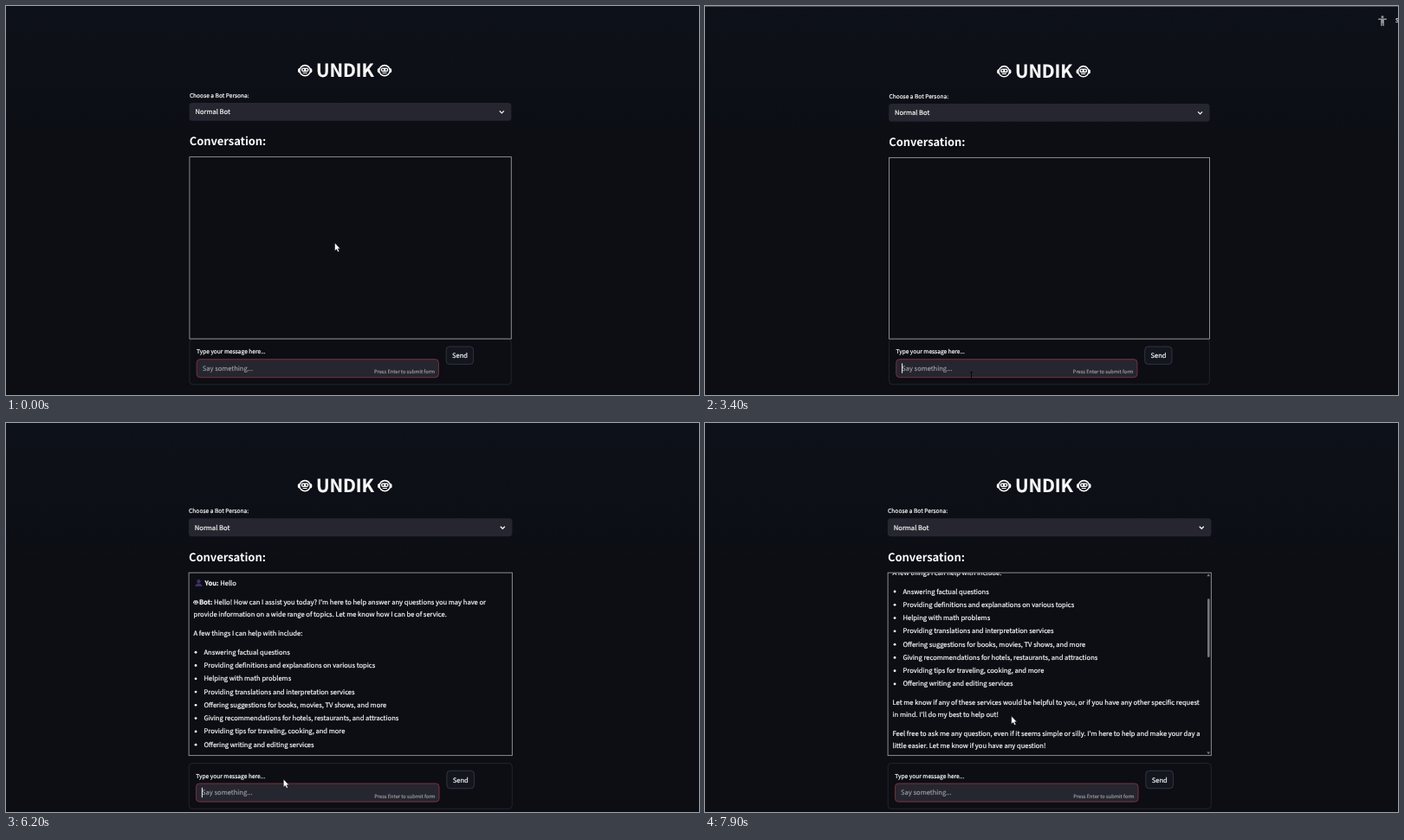
Recreate the animation shown at these times as an HTML page. Size 800x450 px, loop 8 s.

```html
<!DOCTYPE html>
<html lang="en">
<head>
<meta charset="utf-8">
<title>Chat demo</title>
<style>
  html, body { margin: 0; width: 100%; height: 100%; overflow: hidden; background: #0c0e14; }
  svg { display: block; width: 100vw; height: 100vh; }
  text {
    font-family: "Noto Sans CJK JP", "Noto Sans CJK SC", "Noto Sans CJK", "Open Sans", sans-serif;
    font-size: 7.56px; color: #fafafa; fill: currentColor; stroke: currentColor; stroke-width: .2px;
    white-space: pre; text-rendering: geometricPrecision;
  }
  .b { font-weight: 700; }
  .label { font-size: 6.62px; }
  .hint { font-size: 5.67px; color: #a2a3a9; stroke-width: .12px; text-anchor: end; }
  .title { font-size: 20.8px; font-weight: 700; letter-spacing: -.005em; text-anchor: middle; }
  .head { font-size: 12.98px; font-weight: 700; letter-spacing: -.005em; stroke: none; }
  .ghost { color: #a2a3a9; stroke-width: .12px; }
  .man { fill: none; stroke: #94969c; stroke-width: 1.5; stroke-linecap: round; stroke-linejoin: round; }
</style>
</head>
<body>
<svg id="stage" viewBox="0 0 800 450" xmlns="http://www.w3.org/2000/svg"></svg>
<script>
const LOOP = 8000;
const SENT = 3000, REPLY = 4800;

const text = (x, y, str, cls = "") => `<text x="${x}" y="${y}" class="${cls}">${str}</text>`;

const robot = (x, y, k = 1) => `<g transform="translate(${x} ${y}) scale(${k})">
  <rect x="-8.2" y="-2.6" width="16.4" height="5.4" rx="1.8" fill="#fafafa"/>
  <circle r="6.9" fill="#fafafa"/>
  <ellipse rx="5.4" ry="5.2" fill="#0c0e14"/>
  <rect x="-4.3" y="-3.2" width="8.6" height="4.6" rx="2" fill="#fafafa"/>
  <circle cx="-1.9" cy="-.9" r="1" fill="#0c0e14"/><circle cx="1.9" cy="-.9" r="1" fill="#0c0e14"/>
  <path d="M-2.6 2.8H2.6" stroke="#fafafa" stroke-width="1.1"/></g>`;

const skills = [
  "Answering factual questions",
  "Providing definitions and explanations on various topics",
  "Helping with math problems",
  "Providing translations and interpretation services",
  "Offering suggestions for books, movies, TV shows, and more",
  "Giving recommendations for hotels, restaurants, and attractions",
  "Providing tips for traveling, cooking, and more",
  "Offering writing and editing services"
];
const bullets = skills.map((s, i) => {
  const y = 268.7 + 15.2 * i;
  return `<circle cx="219.8" cy="${y - 2.5}" r="1.4" fill="#fafafa"/>` + text(229.2, y, s);
}).join("");

const chat = `
  <g fill="#3f2f66"><circle cx="223.2" cy="184.6" r="2.2"/>
  <path d="M219.2 190.4q0-3.4 4-3.4t4 3.4z"/></g>
  ${text(230.2, 189.05, '<tspan class="b">You:</tspan> Hello')}
  ${robot(219.9, 208.7, .36)}
  ${text(223.7, 211.4, '<tspan class="b">Bot:</tspan> Hello! How can I assist you today? I\'m here to help answer any questions you may have or')}
  ${text(217.3, 224.9, "provide information on a wide range of topics. Let me know how I can be of service.")}
  ${text(217.3, 246.8, "A few things I can help with include:")}
  ${bullets}
  ${text(217.3, 397, "Let me know if any of these services would be helpful to you, or if you have any other specific request")}
  ${text(217.3, 410.4, "in mind. I'll do my best to help out!")}
  ${text(217.3, 432.3, "Feel free to ask me any question, even if it seems simple or silly. I'm here to help and make your day a")}
  ${text(217.3, 445.8, "little easier. Let me know if you have any question!")}`;

const poses = [
  "M783.5 13.2L782.5 17L785.5 18.6L784.5 22M782.5 17L779.5 20.5M779.5 15.5L783.5 13.2L787 16",
  "M779.2 13.8H787.8M783.5 14V17.6M782.4 14.4V21.2M784.6 14.4V21.2",
  "M784.5 12.6L782.4 16.4L786 18L787.4 21.2M782.4 16.4L778.8 20.6M780.2 13.4L784.5 12.6L787.6 15.4"
];

const stage = document.getElementById("stage");
stage.innerHTML = `
<defs>
  <linearGradient id="bg" x2="0" y2="1">
    <stop offset="0" stop-color="#0d1119"/><stop offset=".35" stop-color="#0c0e14"/>
    <stop offset="1" stop-color="#0c0e14"/>
  </linearGradient>
  <clipPath id="box"><rect x="212.3" y="175" width="370.6" height="209.6"/></clipPath>
</defs>
<rect width="800" height="450" fill="url(#bg)"/>
<g id="page">
  <rect x="-5" y="-2" width="815" height="1.6" fill="#4a4c52"/>
  ${robot(345.2, 74.6)}${text(391.3, 82.2, "UNDIK", "title")}${robot(437, 74.6)}
  ${text(211.9, 105.6, "Choose a Bot Persona:", "label")}
  <rect x="211.6" y="112" width="371.8" height="20.8" rx="3.6" fill="#25262f"/>
  ${text(218.6, 125.3, "Normal Bot")}
  <path d="M569.8 121.4L572.3 123.9L574.8 121.4" fill="none" stroke="#fafafa" stroke-width="1.3"/>
  ${text(211.8, 161.5, "Conversation:", "head")}
  <g id="form">
    <rect x="212" y="385.4" width="371.2" height="52.4" rx="3.8" fill="none" stroke="#24272f" stroke-width=".9"/>
    ${text(220, 402.3, "Type your message here...", "label")}
    <rect x="220.2" y="408.7" width="279.2" height="21" rx="3.8" fill="#25262f" stroke="#8a303d" stroke-width=".9"/>
    <g id="ghost">${text(226.8, 421.8, "Say something...", "ghost")}</g>
    <text id="typed" x="227" y="421.8"></text>
    <rect id="caret" y="413.4" width="1" height="11.4" fill="#fafafa"/>
    ${text(495, 425.4, "Press Enter to submit form", "hint")}
    <rect x="508.2" y="394" width="31.4" height="20.4" rx="3.8" fill="#13161e" stroke="#3c3e47" stroke-width=".8"/>
    ${text(515, 407.2, "Send")}
  </g>
  <g clip-path="url(#box)"><g id="chat">${chat}</g></g>
  <rect x="211.9" y="174.6" width="371.4" height="210.4" fill="none" stroke="#98999c" stroke-width=".9"/>
  <g id="bar" fill="#77787b">
    <path d="M578.2 178.6h4l-2-2.6z M578.2 381h4l-2 2.6z"/>
    <rect id="thumb" x="579" width="2.6" height="67.4" rx="1.2"/>
  </g>
  <g id="busy">
    <circle cx="783.5" cy="11.4" r="1.5" fill="#94969c"/>
    <path id="man" class="man"/>
    ${text(798.4, 18, "Stop", "label")}
  </g>
</g>
<path id="arrow" d="M0 0V9.2L2.1 7.4L3.6 10.6L5.2 9.8L3.8 6.8H6.4Z" fill="#fff" stroke="#0a0a0c" stroke-width=".5"/>
<path id="beam" d="M-1.4-4H1.4M0-4V4M-1.4 4H1.4" fill="none" stroke="#08090c" stroke-width="1"/>`;

const $ = id => document.getElementById(id);
const show = (id, on) => $(id).setAttribute("display", on ? "inline" : "none");
const move = (id, x, y) => $(id).setAttribute("transform", `translate(${x} ${y})`);
const smooth = u => u * u * (3 - 2 * u);
const linear = u => u;

// Rows of [time, ...values], blended between neighbours.
function track(t, keys, ease = smooth) {
  const i = keys.findIndex(k => k[0] > t);
  if (i < 0) return keys[keys.length - 1].slice(1);
  if (i === 0) return keys[0].slice(1);
  const a = keys[i - 1], b = keys[i];
  const u = ease((t - a[0]) / (b[0] - a[0]));
  return a.slice(1).map((v, j) => v + (b[j + 1] - v) * u);
}

// scale, x, y
const camera = [
  [0, 1, 0, 0], [900, .9965, 1.29, 1.41], [3850, .9965, 1.29, 1.41],
  [4000, 1, 0, .9], [4600, 1.005, -1.86, -2.3]
];
const pointer = [
  [0, 379.5, 274], [400, 379.5, 274], [1250, 307.7, 427], [4000, 307.5, 427.5],
  [4700, 320.5, 434], [5700, 320.5, 434], [6050, 320.3, 412], [6300, 320.3, 412], [6650, 353.7, 339]
];
const scroll = [[6750, 0], [6900, 11], [7300, 45], [7800, 70.2]];
const keysDown = [1300, 2400, 2600, 2700, 2800];

function caretOn(t) {
  if (t < 1300) return false;
  if (t < SENT) return t < 1800 || t >= 2300;
  return (t - SENT) % 1060 < 530;
}

function draw(t) {
  const [s, x, y] = track(t, camera);
  $("page").setAttribute("transform", `translate(${x} ${y}) scale(${s})`);

  const count = t < SENT ? keysDown.filter(k => k <= t).length : 0;
  $("typed").textContent = "Hello".slice(0, count);
  show("ghost", !count);
  show("caret", caretOn(t));
  $("caret").setAttribute("x", 226.6 + (count ? $("typed").getComputedTextLength() + .2 : 0));

  const replied = t >= REPLY;
  move("form", 0, replied ? 8.55 : 0);
  show("chat", replied);
  const [off] = track(t, scroll, linear);
  move("chat", 0, -off / 1.005);
  show("bar", t >= 6400);
  $("thumb").setAttribute("y", 181 + off * .335);

  show("busy", t >= 3100 && t < 5000);
  $("man").setAttribute("d", poses[Math.floor(Math.max(0, t - 3200) / 200) % poses.length]);

  const [px, py] = track(t, pointer);
  const inInput = py > (replied ? 416 : 408);
  const overText = t >= 6600 && t < 7600;
  const beam = inInput || overText;
  move("arrow", px, py);
  move("beam", px, py);
  show("arrow", !beam);
  show("beam", beam);
}

const start = performance.now();
function tick() {
  draw((performance.now() - start) % LOOP);
  requestAnimationFrame(tick);
}
tick();
</script>
</body>
</html>
```
